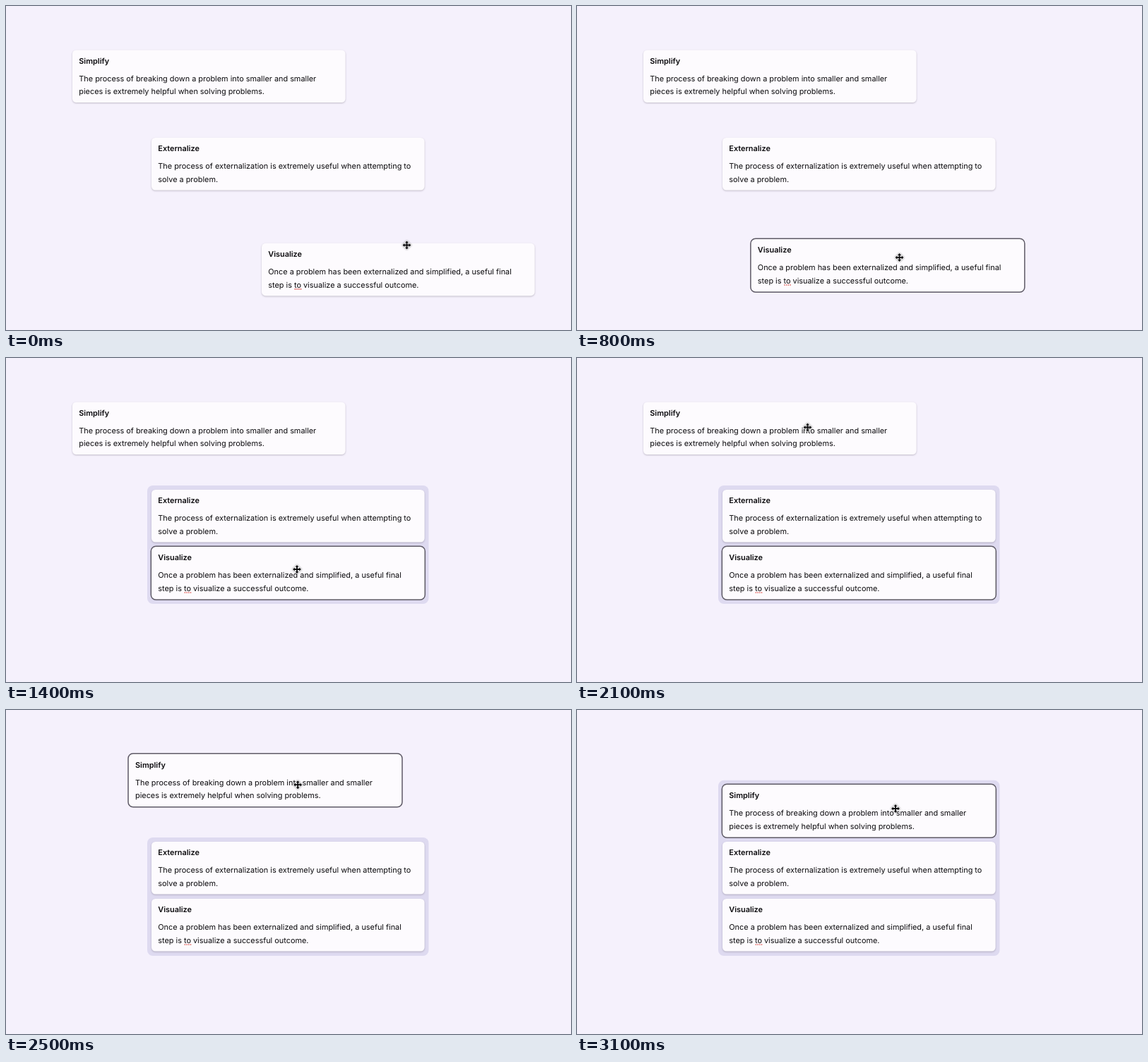
These frames come from a looping animation (800 by 460 pixels, 3300 ms). An HTML page:

```html
<!DOCTYPE html>
<html lang="en">
<head>
<meta charset="utf-8">
<title>Grouping cards</title>
<style>
  html, body { margin: 0; width: 100%; height: 100%; overflow: hidden; background: #f5f1fc; }
  svg { display: block; width: 800px; height: 460px; }
  text { font: 400 10.88px Inter, sans-serif; fill: #0b0a0d; text-rendering: geometricPrecision; }
  .title { font-weight: 600; }
  .card rect { x: 0; y: 0; width: 386.6px; height: 74.7px; rx: 5.6px; fill: #fdfbfe;
    filter: drop-shadow(0 1.1px 1px rgba(35, 28, 45, .25)); }
  .card.selected rect { x: -.7px; y: -.7px; width: 388px; height: 76.1px; rx: 7px;
    stroke: #5e5a66; stroke-width: 1.5; filter: none; }
  .typo { stroke: #dd4a42; stroke-width: 1.7; stroke-linecap: round; stroke-dasharray: 0 2.7; }
  #group { fill: #dedaf0; }
  #cursor { fill: #0c0b0e; stroke: #fff; stroke-width: 1.3; paint-order: stroke; stroke-linejoin: round;
    filter: drop-shadow(0 .8px .9px rgba(0, 0, 0, .45)); }
</style>
</head>
<body>
<svg viewBox="0 0 800 460">
  <rect id="group" x="200" width="398.5" rx="8"/>
  <g id="simplify" class="card">
    <rect/>
    <text class="title" x="9.3" y="19.5">Simplify</text>
    <text x="9.3" y="44.5">The process of breaking down a problem into smaller and smaller</text>
    <text x="9.3" y="63">pieces is extremely helpful when solving problems.</text>
  </g>
  <g id="externalize" class="card" transform="translate(206 186.9)">
    <rect/>
    <text class="title" x="9.3" y="19.5">Externalize</text>
    <text x="9.3" y="44.5">The process of externalization is extremely useful when attempting to</text>
    <text x="9.3" y="63">solve a problem.</text>
  </g>
  <g id="visualize" class="card">
    <rect/>
    <text class="title" x="9.3" y="19.5">Visualize</text>
    <text x="9.3" y="44.5">Once a problem has been externalized and simplified, a useful final</text>
    <text x="9.3" y="63">step is to visualize a successful outcome.</text>
    <path class="typo" d="M47.4 65.1h8.2"/>
  </g>
  <path id="cursor" d="M0-6 2.6-3.2H.9V-.9H3.2V-2.6L6 0 3.2 2.6V.9H.9V3.2H2.6L0 6-2.6 3.2H-.9V.9H-3.2V2.6L-6 0-3.2-2.6V-.9H-.9V-3.2H-2.6Z"/>
</svg>
<script>
  const LOOP = 3300, STEP = 100;

  const out = p => u => 1 - (1 - u) ** p;
  const inOut = p => u => u < .5 ? (2 * u) ** p / 2 : 1 - (2 - 2 * u) ** p / 2;

  const rest = { x: 567.5, y: 339.5 };
  const grabVisualize = { x: 572, y: 363 };
  const grabSimplify = { x: 333.5, y: 106.2 };

  // Pointer strokes, each from wherever the last one ended
  const strokes = [
    { start: 200, end: 600, to: grabVisualize, ease: inOut(2) },
    { start: 600, end: 1300, to: { x: 412, y: 300 }, ease: out(3.8), easeY: inOut(3) },
    { start: 1400, end: 1900, to: { x: 326.5, y: 98.5 }, ease: inOut(2) },
    { start: 2100, end: 2300, to: grabSimplify, ease: inOut(2) },
    { start: 2300, end: 2500, to: { x: 413.2, y: 106.2 }, ease: inOut(2) },
    { start: 2500, end: 3100, to: { x: 451, y: 140 }, ease: out(3) }
  ];

  // Each card rests at home, follows the pointer while held, then snaps to its slot
  const cards = {
    simplify: { home: { x: 94, y: 62.4 }, slot: { x: 206, y: 105.9 }, grab: grabSimplify, from: 2300, drop: 3000, until: LOOP },
    visualize: { home: { x: 362, y: 336.8 }, slot: { x: 206, y: 267.9 }, grab: grabVisualize, from: 700, drop: 1300, until: 2300 }
  };

  const el = id => document.getElementById(id);
  const move = (id, { x, y }) => el(id).setAttribute("transform", `translate(${x} ${y})`);

  function pointerAt(t) {
    let { x, y } = rest;
    for (const { start, end, to, ease, easeY = ease } of strokes) {
      const u = Math.min(1, Math.max(0, (t - start) / (end - start)));
      x += (to.x - x) * ease(u);
      y += (to.y - y) * easeY(u);
    }
    return { x, y };
  }

  function cardAt({ home, slot, grab, from, drop }, t, pointer) {
    if (t < from) return home;
    if (t >= drop) return slot;
    return { x: home.x + pointer.x - grab.x, y: home.y + pointer.y - grab.y };
  }

  function draw(now) {
    const t = Math.floor((now % LOOP) / STEP) * STEP;
    const pointer = pointerAt(t);
    move("cursor", pointer);

    for (const [id, card] of Object.entries(cards)) {
      move(id, cardAt(card, t, pointer));
      el(id).classList.toggle("selected", t >= card.from && t < card.until);
    }

    const top = t >= cards.simplify.drop ? 99.8 : 181;
    el("group").setAttribute("y", top);
    el("group").setAttribute("height", 349 - top);
    el("group").style.display = t >= cards.visualize.drop ? "" : "none";
  }

  const start = performance.now();
  function tick() {
    draw(performance.now() - start);
    requestAnimationFrame(tick);
  }
  tick();
</script>
</body>
</html>
```
